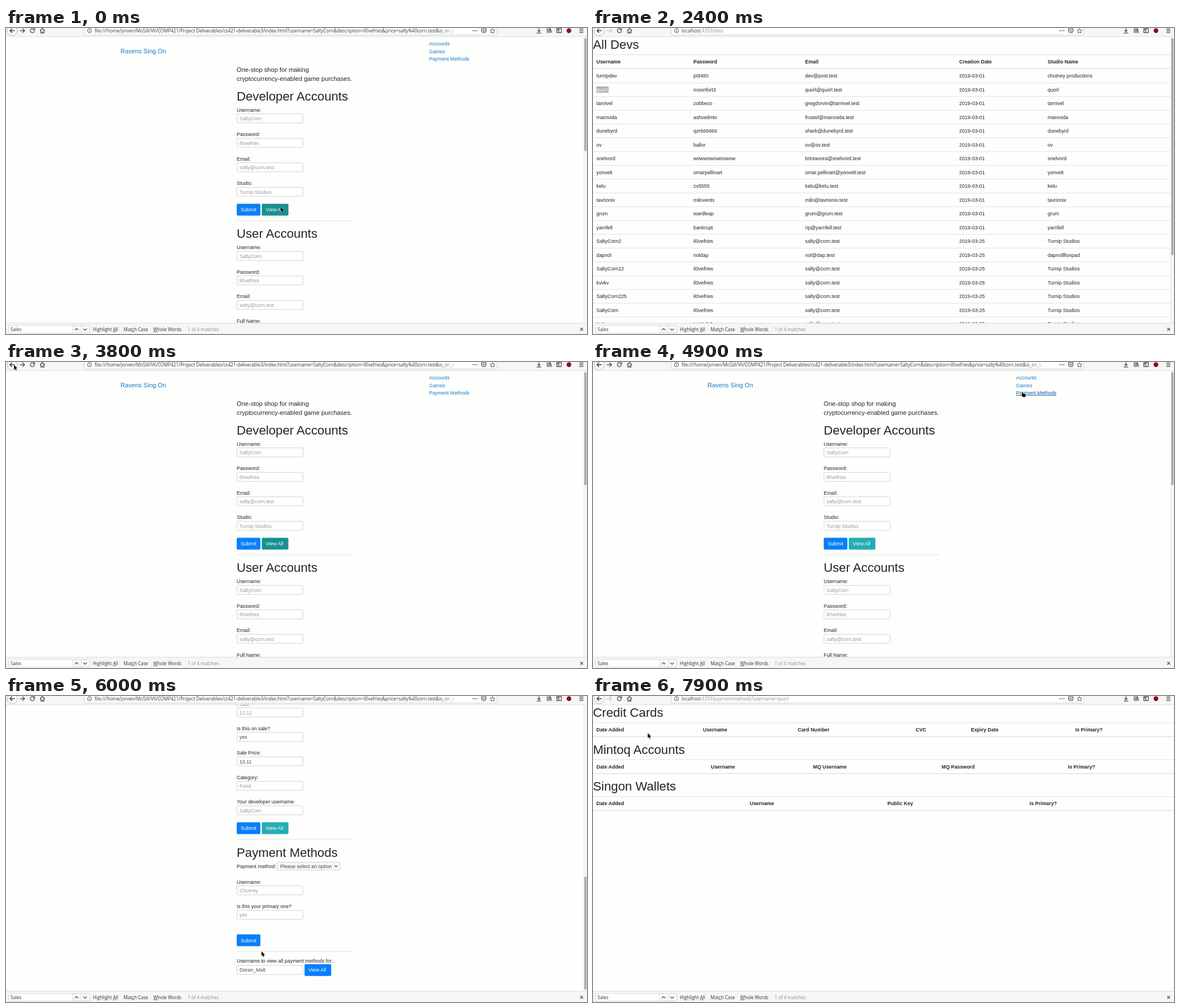
These frames come from a looping animation (1030 by 544 pixels, 8 s). An HTML page:

```html
<!DOCTYPE html>
<html lang="en">
<head>
<meta charset="utf-8">
<title>Account forms</title>
<style>
html, body { margin: 0; width: 100%; height: 100%; overflow: hidden; background: #fefefc; }
svg { display: block; width: 1030px; height: 544px; }
text { font-family: "Liberation Sans", Arial, sans-serif; font-size: 8.89px; fill: #212529; white-space: pre; }
.h { font-size: 22.2px; }
.lead { font-size: 11.11px; }
.b { font-weight: bold; }
.hint { fill: #999; }
.val { fill: #43494f; }
.link { fill: #157bd0; }
.btn { fill: #fff; }
.ui { font-family: "Open Sans", "Noto Sans", sans-serif; font-size: 8.05px; fill: #303436; }
.dim { fill: #8b8f91; }
.icon { fill: none; stroke: #3c4043; stroke-width: 1.2; }
.thin { stroke-width: .9; }
.thick { stroke-width: 1.5; }
.off { stroke: #c0c2c3; }
</style>
</head>
<body>
<svg id="stage" viewBox="0 0 1030 544"></svg>
<script>
const LEFT = 409, PAPER = '#fefefc', BAR = '#f5f7f5';
const BLUE = '#087ffa', TEAL = '#24adb3', TEAL_DARK = '#1a8f91', ORANGE = '#f07746';

// drawing helpers; text is placed by the middle of its capitals
const text = (x, mid, s, cls = '', size = 8.89) =>
  `<text x="${x}" y="${mid + size * .36}" class="${cls}">${s}</text>`;
const heading = (x, mid, s) => text(x, mid, s, 'h', 22.2);
const ui = (x, mid, s, cls = '', id = '') =>
  `<text x="${x}" y="${mid + 2.9}" class="ui ${cls}" id="${id}">${s}</text>`;
const rect = (x, y, w, h, fill, more = '') =>
  `<rect x="${x}" y="${y}" width="${w}" height="${h}" fill="${fill}" ${more}/>`;
const icon = (d, cls = '', id = '') => `<path class="icon ${cls}" id="${id}" d="${d}"/>`;
const group = (id, body) => `<g id="${id}">${body}</g>`;
const rule = (y, w, h = 1, x = 0) => rect(x, y, w, h, '#dee2e6');

const box = mid => rect(LEFT + .5, mid - 8, 117, 16, '#fff', 'rx="1.5" stroke="#ced2d6"');
const field = (mid, label, value, cls = 'hint') =>
  text(LEFT, mid, label) + box(mid + 15) + text(414, mid + 15.2, value, cls);
const fields = (mid, rows) => rows.map((r, i) => field(mid + i * 43.5, ...r)).join('');
const button = (x, mid, w, s, fill, id = '') =>
  rect(x, mid - 10.5, w, 21, fill, `rx="2" id="${id}"`) + text(x + 7, mid, s, 'btn');
const divider = y => rule(y, 206, 1, LEFT);
const scrollbar = (y, h) => rect(1024, 16, 6, 509, '#f6f6f6') + rect(1024, 16, .6, 509, '#dcdcdc') +
  rect(1025.3, y, 3.8, h, '#a8a9aa', 'rx="1.9"');

const account = [['Username:', 'SaltyCorn'], ['Password:', 'il0vefries'], ['Email:', 'salty@corn.test']];

const formTop =
  text(203, 41, 'Ravens Sing On', 'link lead', 11.11) +
  text(750, 28, 'Accounts', 'link') + text(750, 41.3, 'Games', 'link') +
  group('payLink', text(750, 54.6, 'Payment Methods', 'link')) +
  text(LEFT, 73.8, 'One-stop shop for making', 'lead', 11.11) +
  text(LEFT, 90.5, 'cryptocurrency-enabled game purchases.', 'lead', 11.11) +
  heading(LEFT, 121, 'Developer Accounts') +
  fields(145.7, [...account, ['Studio:', 'Turnip Studios']]) +
  button(LEFT, 323, 42, 'Submit', BLUE) + button(453.5, 323, 47.2, 'View All', TEAL, 'viewDevs') +
  divider(342.3) + heading(LEFT, 365.5, 'User Accounts') +
  fields(390.2, account) + text(LEFT, 520.7, 'Full Name:') + scrollbar(18, 201);

const formEnd =
  fields(14.2, [['Price:', '12.12'], ['Is this on sale?', 'yes', 'val'], ['Sale Price:', '10.11', 'val'],
    ['Category:', 'Food'], ['Your developer username:', 'SaltyCorn']]) +
  button(LEFT, 235, 42, 'Submit', BLUE) + button(453.5, 235, 47.2, 'View All', TEAL) +
  divider(254) + heading(LEFT, 278, 'Payment Methods') +
  text(LEFT, 302.6, 'Payment method:') +
  rect(480.5, 295.5, 112, 14, '#f7f8f8', 'rx="1.5" stroke="#cfd1d3"') +
  text(486, 302.6, 'Please select an option', 'val') + icon('M582.5 301.2l2.6 2.6 2.6-2.6') +
  fields(330.5, [['Username:', 'Chutney'], ['Is this your primary one?', 'yes']]) +
  button(LEFT, 434.3, 42, 'Submit', BLUE) + divider(453.6) +
  text(LEFT, 470.3, 'Username to view all payment methods for:') + box(487) +
  rect(413, 481, 49, 12, ORANGE, 'id="nameMark"') +
  '<text id="nameValue" x="414" y="490.2"></text>' +
  button(529.3, 487.2, 47.2, 'View All', BLUE, 'viewPay') + scrollbar(321, 201);

// user, password, mail, studio (same as user when left out)
const mail = 'salty@corn.test', studio = 'Turnip Studios', fry = 'il0vefries';
const devs = [
  ['turnipdev', 'p0t4t0!', 'dev@post.test', 'chutney productions'],
  ['quorl', 'moonfort3', 'quorl@quorl.test'],
  ['tarnivel', 'zobbeco', 'gregdorvin@tarnivel.test'],
  ['marovida', 'ashveilmtx', 'frostel@marovida.test'],
  ['dunebyrd', 'qzr666666', 'shark@dunebyrd.test'],
  ['ov', 'ballor', 'ov@ov.test'],
  ['snelvord', 'wowwowowoowow', 'brintavora@snelvord.test'],
  ['yonvelt', 'omarpellinart', 'omar.pellinart@yonvelt.test'],
  ['kelu', 'zx5555', 'kelu@kelu.test'],
  ['tavrionix', 'milovents', 'milo@tavrionix.test'],
  ['grum', 'wardleap', 'grum@grum.test'],
  ['yarnfell', 'bankrupt', 'rip@yarnfell.test'],
  ['SaltyCorn2', fry, mail, studio],
  ['dapnol', 'noldap', 'nol@dap.test', 'dapnollllonpad'],
  ['SaltyCorn22', fry, mail, studio],
  ['kvvkv', fry, mail, studio],
  ['SaltyCorn225', fry, mail, studio],
  ['SaltyCorn', fry, mail, studio],
  ['test', 'test1,2,3', mail, studio]
];
const head = (y, w, title, cols) => heading(0, y + 29, title) + rule(y + 47, w) + rule(y + 71.5, w, 1.4) +
  cols.map(([x, s]) => text(x, y + 59.8, s, 'b')).join('');

const devRow = ([user, pass, addr, firm = user], i) => {
  const mid = 84.9 + i * 24.5, date = i < 12 ? '2019-03-01' : '2019-03-25';
  return text(6, mid, user) + text(178, mid, pass) + text(376, mid, addr) +
    text(649.3, mid, date) + text(806, mid, firm) + rule(mid + 11.9, 1024);
};
const devPage =
  head(0, 1024, 'All Devs', [[6, 'Username'], [178, 'Password'], [376, 'Email'],
    [649.3, 'Creation Date'], [806, 'Studio Name']]) +
  devs.map(devRow).join('') +
  group('rowMark', rect(6, 104, 21.5, 11.2, ORANGE, 'id="markFill"') + text(6, 109.4, 'quorl', 'btn')) +
  scrollbar(18, 386);

const payPage =
  head(0, 1030, 'Credit Cards', [[6, 'Date Added'], [195, 'Username'], [363, 'Card Number'],
    [572, 'CVC'], [670, 'Expiry Date'], [855, 'Is Primary?']]) +
  head(65.7, 1030, 'Mintoq Accounts', [[6, 'Date Added'], [209, 'Username'], [390, 'MQ Username'],
    [618, 'MQ Password'], [842, 'Is Primary?']]) +
  head(131.4, 1030, 'Singon Wallets', [[6, 'Date Added'], [278, 'Username'], [522, 'Public Key'],
    [774, 'Is Primary?']]);

const toolbar =
  rect(0, 0, 1030, 15.5, BAR) + rect(0, 15.2, 1030, .8, '#d9dadb') +
  rect(138.5, -8, 732, 20.5, '#fff', 'rx="2" stroke="#cfd1d2"') +
  '<circle cx="11" cy="4.8" r="9" fill="#fff" stroke="#b4b6b8"/>' +
  icon('M15.5 4.8H7M10.8 1L7 4.8l3.8 3.8', 'thick') +
  icon('M24.5 4.8H33M29.2 1L33 4.8l-3.8 3.8', '', 'forward') +
  icon('M49.7 2.2A3.7 3.7 0 1 0 50.5 5.5M50.8 .5v3.2h-3.2', '', 'reload') +
  icon('M43.5 1.5l6.6 6.6M50.1 1.5l-6.6 6.6', 'off', 'stop') +
  icon('M60.3 5l4.3-4.2L69 5M61.8 4.2v4.6h5.6V4.2M64.6 8.8V6') +
  icon('M144.4 4.8a3.6 3.6 0 1 0 7.2 0a3.6 3.6 0 1 0-7.2 0M148 4.2v2.8M148 2.4v1', 'thin') +
  ui(157, 5, '', '', 'url') +
  rect(770, 0, 37, 11, 'url(#fade)') + rect(807, 0, 62, 11, '#fff') +
  [828, 831.3, 834.6].map(x => `<circle cx="${x}" cy="4.8" r="1" fill="#555"/>`).join('') +
  icon('M843 1.5h8v3a4 4 0 0 1-8 0zM845 3.8l2 2 2-2') +
  icon('M862.5 .8l1.3 2.8 3 .3-2.2 2.1.6 3-2.7-1.5-2.7 1.5.6-3-2.2-2.1 3-.3z', 'thin') +
  icon('M944.8 .2v6M942 3.8l2.8 2.8 2.8-2.8M941 8.8h7.6') +
  icon('M959.5 .5v8.3M962 .5v8.3M964.3 .5v8.3M965 1l2.4 7.6') +
  icon('M976.5 1.2h8v7h-8zM980 1.2v7M977 3.4h2.4') +
  '<circle cx="998" cy="4.8" r="4.2" fill="#8a0f1c"/>' +
  icon('M1016.5 1.8h7M1016.5 4.8h7M1016.5 7.8h7');

const under = s => `<tspan text-decoration="underline">${s}</tspan>`;
const findbar =
  rect(0, 524.5, 1030, 20, BAR) + rect(0, 524.5, 1030, .8, '#d2d4d5') +
  rect(4.5, 529, 144, 13, '#fbfbfb', 'rx="1.5" stroke="#d0d2d3"') +
  rect(5, 529.5, 112.5, 12, '#fff') + rect(117.5, 529, .8, 13, '#d0d2d3') + rect(132.7, 529, .8, 13, '#d0d2d3') +
  icon('M122 537.3l3.2-3.2 3.2 3.2') + icon('M137 534.3l3.2 3.2 3.2-3.2') +
  ui(8, 535.7, 'Sales') + ui(154, 535.7, `Highlight ${under('A')}ll`) +
  ui(208.5, 535.7, `Mat${under('c')}h Case`) + ui(261, 535.7, `${under('W')}hole Words`) +
  ui(322, 535.7, '1 of 4 matches', 'dim') + icon('M1018 533.2l5 5M1023 533.2l-5 5');

const pointer = (id, d) =>
  `<path id="${id}" d="${d}" stroke="#fff" stroke-width=".6" paint-order="stroke"/>`;
const cursors = group('cursor',
  pointer('arrow', 'M0 0v8.6l2-1.8 1.5 3.2 1.4-.7-1.4-3H6.2z') +
  pointer('hand', 'M1 0q1-.5 1.2.6v2.6l4 .9q1 .4.8 1.5l-.7 3.6H2L-.6 5.6q0-1.2 1.6-.2z') +
  icon('M-2-5h1.5l.5.5.5-.5H2M0-4.5v9M-2 5h1.5l.5-.5.5.5H2', 'thin', 'beam'));

const stage = document.getElementById('stage');
stage.innerHTML =
  '<defs><linearGradient id="fade"><stop stop-color="#fff" stop-opacity="0"/><stop offset="1" stop-color="#fff"/></linearGradient></defs>' +
  rect(0, 0, 1030, 544, PAPER) +
  group('formTop', formTop) + group('formEnd', formEnd) + group('devPage', devPage) + group('payPage', payPage) +
  toolbar + findbar + cursors;

const el = {};
stage.querySelectorAll('[id]').forEach(n => { el[n.id] = n; });
const show = (id, on) => { el[id].style.display = on ? '' : 'none'; };

// ms, x, y
const path = [
  [0, 487, 318], [400, 487, 318], [500, 468, 304], [600, 392, 254], [700, 300, 192], [900, 160, 138],
  [1100, 72, 116], [1300, 41, 109], [1500, 41, 109], [1700, 32, 110], [1900, 32, 110], [2300, 16, 6],
  [2600, 139, 30], [2700, 456, 73], [2900, 456, 73], [3000, 249, 40], [3600, 42, 26], [3700, 14, 5],
  [3900, 14, 5], [4400, 470, 60], [4800, 760, 53], [5000, 760, 53], [5300, 652, 137], [6000, 453, 454],
  [6200, 430, 482], [6700, 430, 482], [7000, 559, 487], [7500, 559, 487], [7600, 109, 77],
  [7800, 109, 77], [7900, 97, 66], [8000, 97, 66]
];
const within = (t, a, b) => t >= a && t < b;
function place(t) {
  const i = path.findIndex(k => k[0] > t);
  const [a, x, y] = path[i - 1], [b, u, v] = path[i], k = (t - a) / (b - a);
  return [x + (u - x) * k, y + (v - y) * k];
}

const local = rest => `localhost<tspan class="dim">:4293/${rest}</tspan>`;
const formUrl = 'file:///home/jorven/McGill/VII/COMP421/Project Deliverables/cs421-deliverable3/index.html' +
  '?username=SaltyCorn&amp;description=il0vefries&amp;price=salty%40corn.test&amp;is_on_s';
const urls = {
  formTop: formUrl,
  formEnd: formUrl,
  devPage: local('devs'),
  payPage: local('paymentmethods?username=quorl')
};
let shownUrl;

function draw(t) {
  const page = t < 600 ? 'formTop' : t < 3800 ? 'devPage' : t < 5100 ? 'formTop' : t < 7200 ? 'formEnd' : 'payPage';
  Object.keys(urls).forEach(p => show(p, p === page));
  if (urls[page] !== shownUrl) el.url.innerHTML = shownUrl = urls[page];

  const loading = within(t, 500, 900) || within(t, 7100, 7400);
  show('reload', !loading);
  show('stop', loading);
  el.forward.classList.toggle('off', urls[page] !== formUrl);

  const dark = t < 600 || within(t, 3800, 3900);
  el.viewDevs.setAttribute('fill', within(t, 100, 200) ? '#157c80' : dark ? TEAL_DARK : TEAL);
  el.viewDevs.setAttribute('stroke', t >= 200 ? '#80d2d5' : 'none');
  const onLink = within(t, 4800, 5100);
  el.payLink.firstChild.style.cssText = onLink ? 'fill:#0b57a4;text-decoration:underline' : '';

  show('rowMark', within(t, 1700, 3800));
  el.markFill.setAttribute('fill', t < 2400 ? ORANGE : '#b0b0b0');
  const marked = within(t, 6600, 6700);
  show('nameMark', marked);
  el.nameValue.textContent = t < 6700 ? 'Doran_Malt' : 'quorl';
  el.nameValue.setAttribute('class', marked ? 'btn' : 'val');
  el.viewPay.setAttribute('fill', t >= 6900 ? '#0a6bd8' : BLUE);

  show('cursor', !within(t, 2400, 2600) && !within(t, 3100, 3600));
  const beam = within(t, 1300, 2000) || within(t, 6200, 6800);
  show('beam', beam);
  show('hand', onLink);
  show('arrow', !beam && !onLink);
  el.cursor.setAttribute('transform', `translate(${place(t)})`);
}

const start = performance.now();
function tick() {
  const t = (performance.now() - start) % 8000;
  draw(Math.floor(t / 100) * 100);
  requestAnimationFrame(tick);
}
tick();
</script>
</body>
</html>
```
